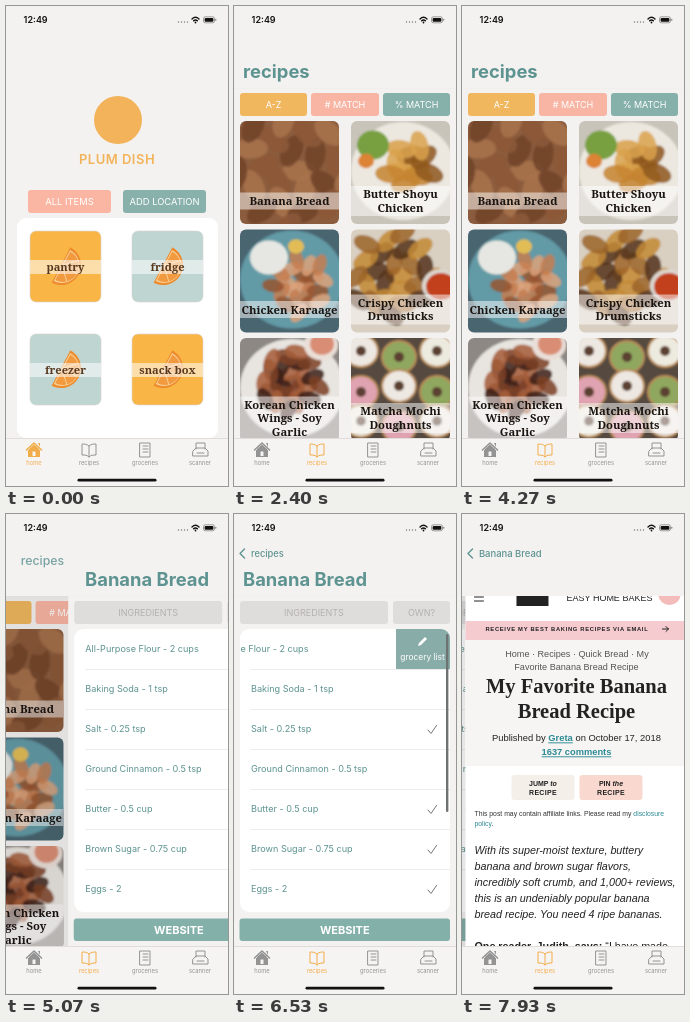
Write an HTML page that moves like this. It is 222x480 px and loops after 8 s.

```html
<!DOCTYPE html>
<html lang="en">
<head>
<meta charset="utf-8">
<title>Kitchen inventory app</title>
<style>
  html, body { margin: 0; width: 100%; height: 100%; overflow: hidden; background: #f4f2f1; }
  svg { display: block; width: 100vw; height: 100vh; }
  text { font-family: Inter, Roboto, sans-serif; white-space: pre; }
  .slab { font-family: "Noto Serif", serif; font-weight: 700; }
  .web text { font-family: "Liberation Sans", Arial, sans-serif; }
  .web .serif { font-family: "Liberation Serif", "Times New Roman", serif; }
  .line { fill: none; stroke-width: 1; stroke-linecap: round; stroke-linejoin: round; }
</style>
</head>
<body>
<svg id="stage" viewBox="0 0 222 480"></svg>
<script>
const LOOP = 8000, W = 222;
const TEAL = '#5d9390', ORANGE = '#f2b35a', PAPER = '#f4f2f1', GREY = '#939393';

// Markup helpers; text is placed by its vertical centre.
const rect = (x, y, w, h, fill, r = 0, more = '') =>
  `<rect x="${x}" y="${y}" width="${w}" height="${h}" fill="${fill}" rx="${r}" ${more}/>`;
const text = (x, y, size, fill, label, more = '') =>
  `<text x="${x}" y="${y + size * .36}" font-size="${size}" fill="${fill}" ${more}>${label}</text>`;
const mid = (x, y, size, fill, label, more = '') =>
  text(x, y, size, fill, label, `text-anchor="middle" ${more}`);
const stroke = (d, color, more = '') => `<path class="line" d="${d}" stroke="${color}" ${more}/>`;
const oval = (x, y, rx, ry, fill, more = '') =>
  `<ellipse cx="${x}" cy="${y}" rx="${rx}" ry="${ry}" fill="${fill}" ${more}/>`;
const group = (id, body, more = '') => `<g id="${id}" ${more}>${body}</g>`;
const button = (x, y, w, h, fill, label, size = 9, color = '#fff', more = '') =>
  rect(x, y, w, h, fill, 3) + mid(x + w / 2, y + h / 2, size, color, label, more);
const clip = (id, shape) => `<clipPath id="${id}">${shape}</clipPath>`;
const BOLD = 'font-weight="700"';

function random(seed) {
  return () => (seed = seed * 16807 % 2147483647) / 2147483647;
}

// Home
function locationTile(x, y, fill, name) {
  const slice = `<g transform="translate(${x + 31} ${y + 34}) rotate(-62)">
    <path d="M-20 0A20 20 0 0 0 20 0Z" fill="#ee8b2d"/>
    <path d="M-17.5 1A17.5 17.5 0 0 0 17.5 1Z" fill="#f8cf94"/>
    <path d="M-16 2A16 16 0 0 0 16 2Z" fill="#f29a3f"/>
    ${stroke('M0 1V17M0 1L-12 13M0 1L12 13', '#f8cf94')}</g>`;
  return rect(x, y, 71, 71, fill, 6, 'stroke="#d9d5d0" stroke-width=".6"') + slice +
    rect(x, y + 29, 71, 14, '#fff', 0, 'opacity=".55"') +
    mid(x + 35.5, y + 36, 11.1, '#57391f', name, 'class="slab"');
}
const home = rect(0, 0, W, 432, PAPER) +
  `<circle cx="112" cy="114" r="24" fill="${ORANGE}"/>` +
  mid(111, 153.5, 13, ORANGE, 'PLUM DISH', 'font-weight="600" letter-spacing=".5"') +
  button(22, 184, 83, 23, '#fbb5a3', 'ALL ITEMS', 9.4) +
  button(117, 184, 83, 23, '#88b1ab', 'ADD LOCATION', 9.4) +
  rect(11, 212, 201, 220, '#fff', 9) +
  locationTile(24, 225, '#f9b646', 'pantry') + locationTile(126, 225, '#bed5d2', 'fridge') +
  locationTile(24, 328, '#bed5d2', 'freezer') + locationTile(126, 328, '#f9b646', 'snack box');

// Fridge
const stock = { blueberries: 10, butter: 14, 'chicken thighs': 4, 'chicken wings': 5,
  eggs: 14, 'green onions': 4, mirin: 23 };
const separator = y => rect(17, y, 199, .6, '#e2e0de');
const headerLine = rect(0, 81.5, W, .6, '#d5d2cf');
const fridge = rect(0, 0, W, 432, PAPER) + headerLine +
  rect(10, 91, 201, 20, '#e3e0dd', 4) +
  stroke('M20.8 102.8L23.8 106M22 100a3.4 3.4 0 1 1-6.8 0a3.4 3.4 0 1 1 6.8 0', '#777') +
  rect(0, 115, W, .6, '#dedbd8') +
  button(6, 121, 102, 23, '#f2b761', 'ITEM') +
  button(114, 121, 102, 23, '#f6c1b7', 'DAY(S) REMAINING') +
  rect(6, 150, 210, 277, '#fff', 9) +
  Object.entries(stock).map(([name, days], i) => {
    const y = 170 + 40 * i;
    return text(17, y, 7.6, '#898989', name) +
      mid(180.5, y, 8, days < 10 ? '#f0b36a' : TEAL, days, 'font-weight="600"') +
      (i < 6 ? separator(y + 20) : '');
  }).join('');

// Recipes: soft shapes stand in for the dish photographs.
const dishes = [
  { name: ['Banana Bread'], back: '#8b5c3c', tones: ['#a8734d', '#8c5939', '#70442a'], n: 22, size: 17, at: [50, 50], spread: 52 },
  { name: ['Butter Shoyu', 'Chicken'], back: '#c9c4ba', plate: '#ece8e0', tones: ['#c5842f', '#daa24c', '#8f571e'], n: 11, size: 15, at: [59, 45], spread: 20,
    sides: [[22, 24, 16, '#78a03f'], [15, 40, 8, '#dc8334']] },
  { name: ['Chicken Karaage'], back: '#4a6570', plate: '#629aa6', tones: ['#c57c50', '#dda27a', '#96542f'], n: 20, size: 11, at: [60, 55], spread: 25,
    sides: [[29, 28, 19, '#e6e7e2'], [56, 17, 8, '#e2bd55']] },
  { name: ['Crispy Chicken', 'Drumsticks'], back: '#d9d0c2', tones: ['#c48a35', '#54331b', '#9d6429'], n: 24, size: 14, at: [42, 46], spread: 38,
    sides: [[89, 56, 18, '#ddd8d0'], [90, 57, 15, '#c3401f']] },
  { name: ['Korean Chicken', 'Wings - Soy', 'Garlic'], back: '#8d8883', plate: '#e8e4df', tones: ['#7d4026', '#3d2018', '#a45c38'], n: 24, size: 12, at: [50, 44], spread: 27,
    sides: [[81, 7, 17, '#eadfd8'], [82, 6, 12, '#d98d74']] },
  { name: ['Matcha Mochi', 'Doughnuts'], back: '#54493f', rings: ['#8fa75f', '#eee8e2', '#e0a3b1', '#edeadf'] }
];
function photo(dish, i) {
  const rnd = random(71 + i * 97);
  let out = rect(-5, -5, 109, 113, dish.back);
  if (dish.rings) {
    for (let k = 0; k < 9; k++) {
      const x = 10 + k % 3 * 38, y = 13 + (k / 3 | 0) * 35 + k % 2 * 6;
      out += oval(x, y, 18, 17, '#b98b58') + oval(x, y, 16, 15, dish.rings[(k * 3 + 1) % 4]) + oval(x, y, 5, 5, '#5c4030');
    }
    return out;
  }
  if (dish.plate) out += oval(52, 50, 52, 49, dish.plate);
  const [cx, cy] = dish.at;
  for (let k = 0; k < dish.n; k++) {
    const angle = k * 2.4, reach = dish.spread * Math.sqrt((k + .5) / dish.n) * 1.15;
    const x = cx + Math.cos(angle) * reach, y = cy + Math.sin(angle) * reach;
    out += oval(x, y, dish.size, dish.size * .6, dish.tones[k % 3],
      `transform="rotate(${rnd() * 180} ${x} ${y})" opacity=".85"`);
  }
  return out + (dish.sides || []).map(([x, y, r, fill]) => oval(x, y, r, r * .9, fill)).join('');
}
function recipeTile(dish, i) {
  const rows = dish.name.length, h = 4 + 13 * rows;
  return group('dish' + i, `<g clip-path="url(#tile)"><g filter="url(#soft)">${photo(dish, i)}</g>` +
    rect(0, 80 - h / 2, 99, h, '#fff', 0, 'opacity=".5"') +
    dish.name.map((line, k) => mid(49.5, 80 + (k - (rows - 1) / 2) * 13.5, 11.3, '#1b1512', line, 'class="slab"')).join('') + '</g>');
}
const recipes = rect(0, 82, W, 350, PAPER) + headerLine +
  button(6, 87, 67, 23, '#f0b75f', 'A-Z') +
  button(77, 87, 68, 23, '#f8b5a4', '# MATCH') +
  button(149, 87, 67, 23, '#86b0aa', '% MATCH') +
  dishes.map(recipeTile).join('');

// Ingredient list
const ingredients = ['All-Purpose Flour - 2 cups', 'Baking Soda - 1 tsp', 'Salt - 0.25 tsp',
  'Ground Cinnamon - 0.5 tsp', 'Butter - 0.5 cup', 'Brown Sugar - 0.75 cup', 'Eggs - 2'];
const owned = [2, 4, 5, 6];
function ingredientRow(label, i) {
  const y = 135 + 40 * i;
  const action = i > 1 ? '' : group('action' + i, rect(162, y - 20, 60, 40, i ? '#a5bdb9' : '#88aca7') +
    `<path d="M184 ${y - 3}l1-3 6-6 2 2-6 6z" fill="#fff"/>` +
    mid(188.5, y + 8, 8.4, '#fff', 'grocery list'));
  const check = owned.includes(i) ? stroke(`M194 ${y + 1}l3 3.5 5.5-8`, '#777') : '';
  return group('row' + i, text(17, y, 9.1, TEAL, label) + check) + action + (i < 6 ? separator(y + 20) : '');
}
const detail = rect(0, 82, W, 350, PAPER) + headerLine +
  button(6, 87, 148, 23, '#dfdddc', 'INGREDIENTS', 9, '#b3b1b0') +
  button(159, 87, 57, 23, '#dfdddc', 'OWN?', 9, '#b3b1b0') +
  rect(6, 115, 210, 283, '#fff', 9) +
  `<g clip-path="url(#card)">${ingredients.map(ingredientRow).join('')}</g>` +
  rect(212, 120, 2.4, 178, '#6f7272', 1.2, 'id="scrollbar"') +
  button(5.5, 404.5, 210.5, 22.5, '#84b0aa', 'WEBSITE', 11, '#fff', BOLD);

// Web page
const link = '#2c8a94';
const story = ['With its super-moist texture, buttery', 'banana and brown sugar flavors,',
  'incredibly soft crumb, and 1,000+ reviews,', 'this is an undeniably popular banana', 'bread recipe. You need 4 ripe bananas.'];
const web = rect(3, 82, W, 350, '#fff') + rect(3, 126, W, 126, '#f7f5f4') +
  stroke('M12 83H21M12 87H21', '#222') + rect(54, 60, 32, 32, '#222') +
  mid(147, 83.5, 9, '#222', 'EASY HOME BAKES') + oval(207, 81, 11, 10, '#f3bcbb') +
  rect(3, 107, W, 19, '#f5cbd0') +
  text(23, 115, 5.8, '#222', 'RECEIVE MY BEST BAKING RECIPES VIA EMAIL', BOLD + ' letter-spacing=".7"') +
  stroke('M200 115H206M203.5 112.5L206 115L203.5 117.5', '#222') +
  mid(114.5, 140, 9.1, '#555', 'Home · Recipes · Quick Bread · My') +
  mid(114, 153, 9.1, '#555', 'Favorite Banana Bread Recipe') +
  mid(114, 172, 20.5, '#222', 'My Favorite Banana', BOLD + ' class="serif"') +
  mid(114, 196.5, 20.5, '#222', 'Bread Recipe', BOLD + ' class="serif"') +
  mid(114, 224, 9.4, '#222', `Published by <tspan fill="${link}" ${BOLD} text-decoration="underline">Greta</tspan> on October 17, 2018`) +
  mid(114, 238, 9.3, link, '1637 comments', BOLD + ' text-decoration="underline"') +
  [['#f5efea', 'JUMP', 'to', 49], ['#f9d8cf', 'PIN', 'the', 117]].map(([fill, verb, small, x]) =>
    rect(x, 261, 63, 25, fill, 3) +
    mid(x + 31.5, 269, 7, '#222', `${verb} <tspan font-style="italic">${small}</tspan>`, BOLD) +
    mid(x + 31.5, 278, 7, '#222', 'RECIPE', BOLD + ' letter-spacing=".3"')).join('') +
  text(12, 299.5, 6.85, '#333', `This post may contain affiliate links. Please read my <tspan fill="${link}">disclosure</tspan>`) +
  text(12, 309.5, 6.85, '#333', `<tspan fill="${link}">policy</tspan>.`) +
  story.map((line, i) => text(12, 336 + 16 * i, 10.75, '#222', line, 'font-style="italic"')).join('') +
  text(12, 432, 10.75, '#222', `<tspan ${BOLD}>One reader, Judith, says:</tspan> “I have made`);

// Navigation bar, tab bar and status bar
const title = (id, label) => group(id, text(9, 65.5, 18.4, TEAL, label, BOLD));
const back = (id, label) => group(id, text(0, 0, 9.3, TEAL, label, 'font-weight="500"'));
const nav = title('fridgeTitle', 'fridge') + title('recipesTitle', 'recipes') + title('detailTitle', 'Banana Bread') +
  back('backHome', 'Back') + back('backRecipes', 'recipes') + back('backDetail', 'Banana Bread') +
  group('chevron', stroke('M10.5 35L6 39.5L10.5 44', TEAL, 'style="stroke-width:1.4"')) +
  group('plus', stroke('M201 39.5H211M206 34.5V44.5', TEAL));

const icons = [
  '<path d="M22 444V451H34V444Z" fill="currentColor"/>' + stroke('M20.5 444L28 437L35.5 444', 'currentColor', 'style="stroke-width:1.6"') +
    '<path d="M23 443L28 438.5L33 443V445H23ZM32 437H34V441Z" fill="currentColor"/>' + rect(26.5, 445.5, 3, 4.5, '#f6f4f2', .5),
  stroke('M83 440C81 438 78 438 76 438V449C79 449 81 449 83 451C85 449 87 449 90 449V438C88 438 85 438 83 440V451', 'currentColor'),
  stroke('M134 437H144V451H134ZM137 440H142M137 443H142M137 446H142', 'currentColor'),
  stroke('M190 443V437H199V443M187 445L190 442H199L202 445V450H187ZM191 447H198', 'currentColor')
];
const tabBar = rect(0, 432, W, 48, '#f6f4f3') + rect(0, 432, W, .6, '#d0cdca') +
  ['home', 'recipes', 'groceries', 'scanner'].map((name, i) =>
    group('tab' + i, icons[i] + mid([28, 83, 139, 194][i], 457, 5.8, 'currentColor', name))).join('') +
  rect(71.5, 472.8, 79, 2.8, '#111', 1.4);
const status = text(17.6, 14, 9, '#111', '12:49', 'font-weight="600"') +
  [173, 176, 179, 182].map(x => oval(x - .5, 16, .7, .7, '#777')).join('') +
  stroke('M186 13Q189.5 9.7 193 13M187.6 14.8Q189.5 13 191.4 14.8', '#111', 'style="stroke-width:1.4"') +
  oval(189.5, 16.5, .9, .9, '#111') +
  rect(197.5, 10.8, 11, 6, 'none', 1.8, 'stroke="#777" stroke-width=".7"') +
  rect(198.6, 11.9, 8.8, 3.8, '#111', 1) + rect(209.3, 12.8, .9, 2, '#777', .4);

const dim = id => rect(0, 0, W, 432, '#000', 0, `id="${id}"`);
const body = id => `<g clip-path="url(#${id})">`;
stage.innerHTML = `<defs><filter id="soft"><feGaussianBlur stdDeviation=".8"/></filter>` +
  clip('tile', rect(0, 0, 99, 103, '#fff', 6)) + clip('card', rect(6, 115, 210, 283, '#fff', 9)) +
  clip('below', rect(0, 82, W, 350, '#fff')) + clip('screen', rect(0, 0, W, 432, '#fff')) + '</defs>' +
  rect(0, 0, W, 480, PAPER) +
  body('screen') + group('home', home + dim('homeDim')) + group('fridge', fridge) + '</g>' +
  body('below') + group('recipes', recipes + dim('recipesDim')) + group('detail', detail + dim('detailDim')) +
  group('web', web, 'class="web"') + '</g>' + nav + tabBar + status;

const $ = id => document.getElementById(id);
const show = (id, on) => $(id).style.display = on ? '' : 'none';
const fade = (id, a) => $(id).setAttribute('opacity', clamp(a));
const move = (id, x, y = 0, scale = 1) => $(id).setAttribute('transform', `translate(${x} ${y}) scale(${scale})`);
const clamp = v => Math.max(0, Math.min(1, v));
const smooth = (t, from, to) => 1 - (1 - clamp((t - from) / (to - from))) ** 3;
// Remaining share of a push: a critically damped spring.
const spring = (t, start) => { const v = Math.max(0, t - start) * .0185; return (1 + v) * Math.exp(-v); };

function push(under, over, p, offset = 0) {
  move(under, -66 * (1 - p));
  fade(under + 'Dim', .1 * (1 - p));
  move(over, W * p + offset);
}
// The large title shrinks into the back label.
const shrinkTitle = (id, p) => move(id, 17 - 8 * p, 39.5 + 26.5 * p, 1 + 1.14 * p);

const BY_NAME = [0, 1, 2, 3, 4, 5], BY_MATCH = [4, 1, 0, 2, 5, 3];

function render(t) {
  const page = t < 70 ? 0 : t < 1930 ? 1 : t < 5070 ? 2 : t < 7670 ? 3 : 4;
  const p = page === 1 ? spring(t, 20) : page === 3 ? spring(t, 4934) : page === 4 ? spring(t, 7600) : 0;

  show('home', page < 2);
  show('fridge', page === 1);
  show('recipes', page === 2 || page === 3);
  show('detail', page > 2);
  show('web', page === 4);
  show('fridgeTitle', page === 1);
  show('plus', page === 1);
  show('backHome', page === 1);
  show('recipesTitle', page === 2);
  show('detailTitle', page === 3);
  show('backRecipes', page === 3);
  show('backDetail', page === 4);
  show('chevron', page % 2 || page === 4);
  fade('chevron', page === 4 ? 1 : 1 - 4 * p);

  if (page === 0) { move('home', 0); fade('homeDim', 0); }
  if (page === 1) {
    push('home', 'fridge', p);
    move('fridgeTitle', 250 * p);
    move('backHome', 17 + 60 * p, 39.5);
    fade('backHome', 1 - p);
    fade('plus', 1 - p);
  }
  if (page === 2) { move('recipes', 0); fade('recipesDim', 0); }
  if (page === 3) {
    push('recipes', 'detail', p);
    fade('detailDim', 0);
    move('detailTitle', 250 * p);
    shrinkTitle('backRecipes', p);
    fade('backRecipes', 1 - p * .6);
  }
  if (page === 4) {
    push('detail', 'web', p, -3);
    shrinkTitle('backDetail', p);
  }

  const order = t >= 3130 && t < 4000 ? BY_MATCH : BY_NAME;
  order.forEach((dish, slot) => move('dish' + dish, 6 + slot % 2 * 111, 115 + (slot >> 1) * 108.5));

  [smooth(t, 6070, 6450) - smooth(t, 6740, 7000), smooth(t, 6900, 7190) - smooth(t, 7400, 7640)].forEach((open, i) => {
    move('row' + i, -56 * open);
    move('action' + i, 60 * (1 - open));
  });
  fade('scrollbar', clamp((t - 5300) / 200) * clamp((6900 - t) / 250));
  for (let i = 0; i < 4; i++) $('tab' + i).style.color = i === (page < 2 ? 0 : 1) ? '#f2ad4b' : GREY;
}

function tick() {
  render(performance.now() % LOOP);
  requestAnimationFrame(tick);
}
tick();
</script>
</body>
</html>
```
